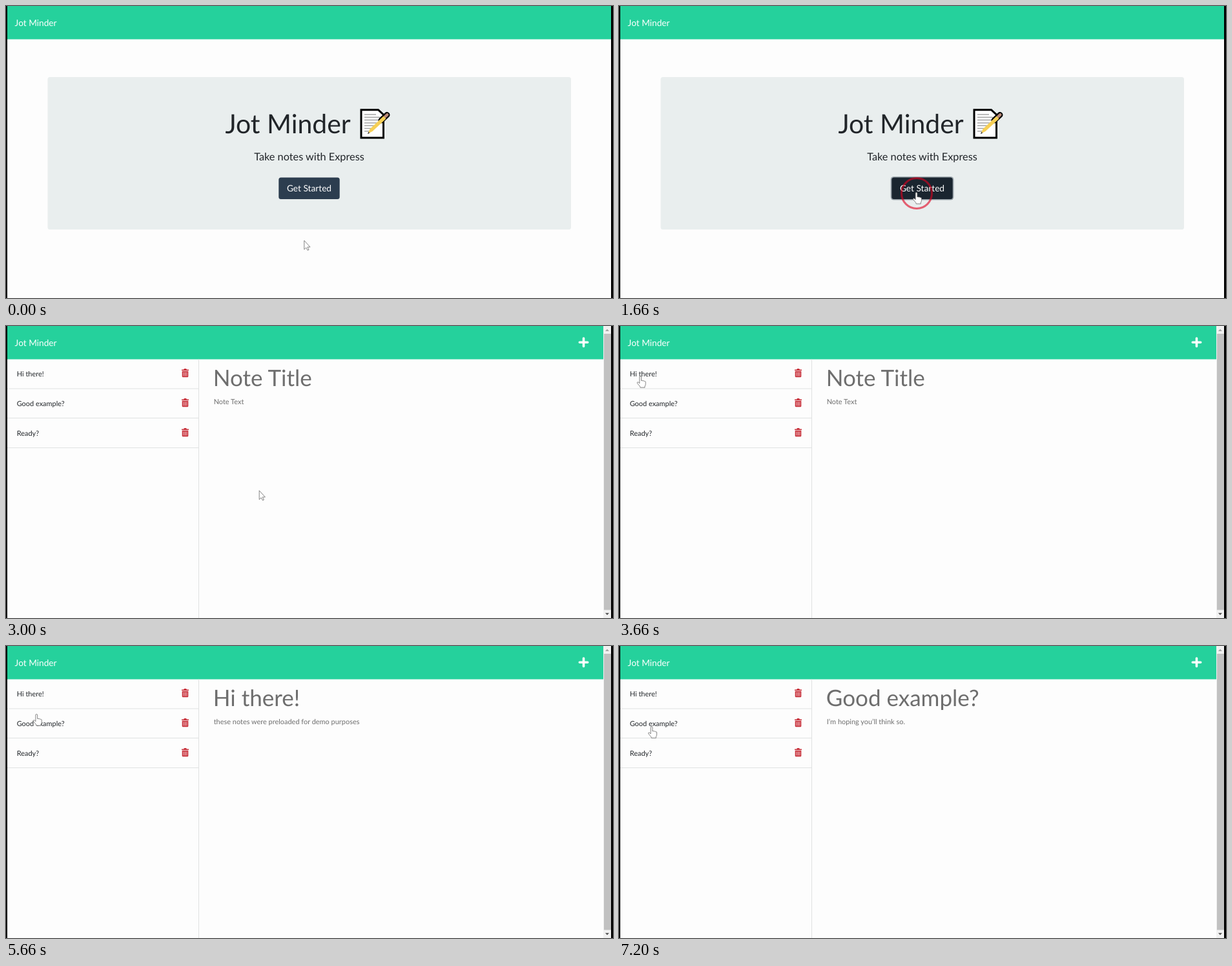
Recreate the animation shown at these times as an HTML page. Size 940x452 px, loop 8000 ms.

```html
<!DOCTYPE html>
<html lang="en">
<head>
<meta charset="utf-8">
<title>Jot Minder</title>
<style>
  html, body { margin: 0; width: 100%; height: 100%; overflow: hidden; background: #fdfdfd; }
  svg { display: block; }
  text { font-family: Lato, sans-serif; fill: #212529; text-rendering: geometricPrecision; }
  .mid { text-anchor: middle; }
  .body { font-size: 10.95px; }
  .note { fill: #6e6e6e; }
  .light { fill: #fff; font-size: 13.69px; }
  .cursor { fill: #fff; stroke: #666; stroke-width: .8; stroke-linejoin: round; }
</style>
</head>
<body>
<svg width="940" height="452" viewBox="0 0 940 452">
  <defs>
    <g id="trash">
      <path d="M-5.5-5.2h3l1-1.4h3l1 1.4h3v1.6h-11zM-4.8-2.9h9.6V5.2q0 1.3-1.3 1.3h-7q-1.3 0-1.3-1.3z" fill="#c9343e"/>
      <path d="M-2.4-1.3V4.8M0-1.3V4.8M2.4-1.3V4.8" stroke="#f6dcde" stroke-width=".9"/>
    </g>
  </defs>
  <rect width="940" height="452" fill="#fdfdfd"/>
  <rect width="940" height="51.5" fill="#25d19c"/>
  <text class="light" x="13.6" y="31">Jot Minder</text>

  <g id="home">
    <rect x="64.5" y="110" width="810.5" height="236" rx="3.5" fill="#e9eeee"/>
    <text x="339.5" y="197" font-size="40.9">Jot Minder</text>
    <g id="memo">
      <path d="M550 160.7h26.5l8 7.5V204H550z" fill="#fff" stroke="#000" stroke-width="3"/>
      <path d="M555 168h18M555 172.3h24M555 176.6h22M555 180.9h19M555 185.2h15M555 189.5h13M555 193.8h8" stroke="#a5a5a5" stroke-width="1.5"/>
      <path d="M581 177L590 168.5" stroke="#000" stroke-width="9" stroke-linecap="round"/>
      <path d="M587 171.5L590.3 168.3" stroke="#b98a78" stroke-width="4.5" stroke-linecap="round"/>
      <path d="M584.5 170.5L588.5 174.5 567.5 194 560.5 197.5 563.5 190.5z" fill="#f6cf55"/>
      <path d="M560 198l1.2-3.2 2 2z" fill="#333"/>
    </g>
    <text class="mid" x="469.5" y="238.7" font-size="16.3">Take notes with Express</text>
    <rect id="focus" x="420.6" y="263.9" width="97.8" height="36.7" rx="5" fill="#9aa4aa"/>
    <rect id="button" x="422.3" y="265.6" width="94.4" height="33.4" rx="3.5"/>
    <text class="light mid" x="469.5" y="287.4">Get Started</text>
  </g>

  <g id="notes">
    <path d="M894.5 19V31.5M888.3 25.2H900.7" stroke="#fff" stroke-width="3.6" stroke-linecap="round"/>
    <path d="M2 97H298M2 142.5H298M2 188.5H298M298.5 51.5V452" stroke="#e0e2e2"/>
    <g id="list"></g>
    <text id="title" class="note" x="320.8" y="93" font-size="35.04"></text>
    <text id="content" class="note body" x="321.7" y="120.7"></text>
    <rect x="925" width="13" height="452" fill="#f1f1f1"/>
    <rect x="926" y="12" width="11" height="427.5" fill="#c1c1c1"/>
    <path d="M928 8h6l-3-3.2z" fill="#a3a3a3"/>
    <path d="M928 444.3h6l-3 3.2z" fill="#505050"/>
  </g>

  <path d="M0 0H2V452H0zM937 0H940V452H937z"/>
  <circle id="ring" fill="none" stroke="#e0001f" stroke-opacity=".6" stroke-width="3"/>
  <path id="arrow" class="cursor" d="M.8 0V13.8L3.8 11 6.1 15.2 8 14.3 5.9 10.1H10z"/>
  <path id="hand" class="cursor" d="M-1.4 9.7V.5a1.4 1.4 0 0 1 2.8 0V6.2q1.3-1.1 2.4 .3 1.4-.8 2.3 .5 1.7-.4 1.9 1.3V11.2q0 2-1.2 3.5V16.7H-.3q0-1.5-1.5-3L-4.8 10.2q-.8-1.9 .8-1.9 1.3 0 2.6 2z"/>
</svg>
<script>
const $ = id => document.getElementById(id);
const LOOP = 8000, STEP = 1000 / 15, PAGE_LOAD = 1860;

// Cursor waypoints: time, x, y
const path = [
  [0, 461, 363], [533, 459, 326], [867, 460.5, 289.5],
  [2067, 460.5, 289.5], [2667, 400, 259],
  [2933, 400, 259], [3667, 33.2, 78.5],
  [5467, 33.2, 78.5], [5667, 47.3, 106.5], [5933, 50.5, 125.7],
  [LOOP, 50.5, 125.7]
];
// Clicks: start, how long the ring stays
const clicks = [[1460, 400], [4130, 200], [6730, 200]];
const panels = [
  [PAGE_LOAD, 'Note Title', 'Note Text'],
  [4260, 'Hi there!', 'these notes were preloaded for demo purposes'],
  [6860, 'Good example?', 'I’m hoping you’ll think so.']
];

$('list').innerHTML = ['Hi there!', 'Good example?', 'Ready?'].map((name, i) =>
  `<text class="body" x="16.7" y="${78 + 46 * i}">${name}</text>
   <use href="#trash" x="277.5" y="${72.7 + 46 * i}"/>`).join('');

const clamp = v => Math.max(0, Math.min(1, v));
const mix = (a, b, k) => a + (b - a) * k;
const show = (id, on) => $(id).setAttribute('visibility', on ? 'visible' : 'hidden');

function cursorAt(t) {
  const i = Math.max(1, path.findIndex(p => p[0] >= t));
  const [t0, x0, y0] = path[i - 1], [t1, x1, y1] = path[i];
  let k = clamp((t - t0) / (t1 - t0));
  if (t0 === 2933) k = k * k * (3 - 2 * k);
  return [mix(x0, x1, k), mix(y0, y1, k)];
}

function draw(time) {
  const t = Math.floor((time % LOOP + 7) / STEP) * STEP;
  const onNotes = t >= PAGE_LOAD, pressed = t >= 1460;
  const [x, y] = cursorAt(t);

  show('home', !onNotes);
  show('notes', onNotes);
  show('focus', pressed && !onNotes);

  const hover = clamp((t - 790) / 150);
  const shade = [[44, 30], [61, 43], [79, 55]].map(([a, b]) => Math.round(mix(a, b, hover)));
  $('button').setAttribute('fill', pressed ? '#1a252f' : `rgb(${shade})`);

  const [, title, content] = panels.filter(p => t >= p[0]).pop() || panels[0];
  $('title').textContent = title;
  $('content').textContent = content;

  const click = clicks.find(([start, stay]) => t >= start && t < start + stay);
  show('ring', click);
  if (click) {
    $('ring').setAttribute('cx', x + .5);
    $('ring').setAttribute('cy', y + .5);
    $('ring').setAttribute('r', mix(10, 23.5, clamp((t - click[0]) / 130)));
  }

  const pointing = onNotes ? t < 2100 || (x < 298 && y < 189) : y < 299;
  show('hand', pointing);
  show('arrow', !pointing);
  $(pointing ? 'hand' : 'arrow').setAttribute('transform', `translate(${x} ${y})`);
}

const begin = performance.now();
(function tick() {
  draw(performance.now() - begin);
  requestAnimationFrame(tick);
})();
</script>
</body>
</html>
```
